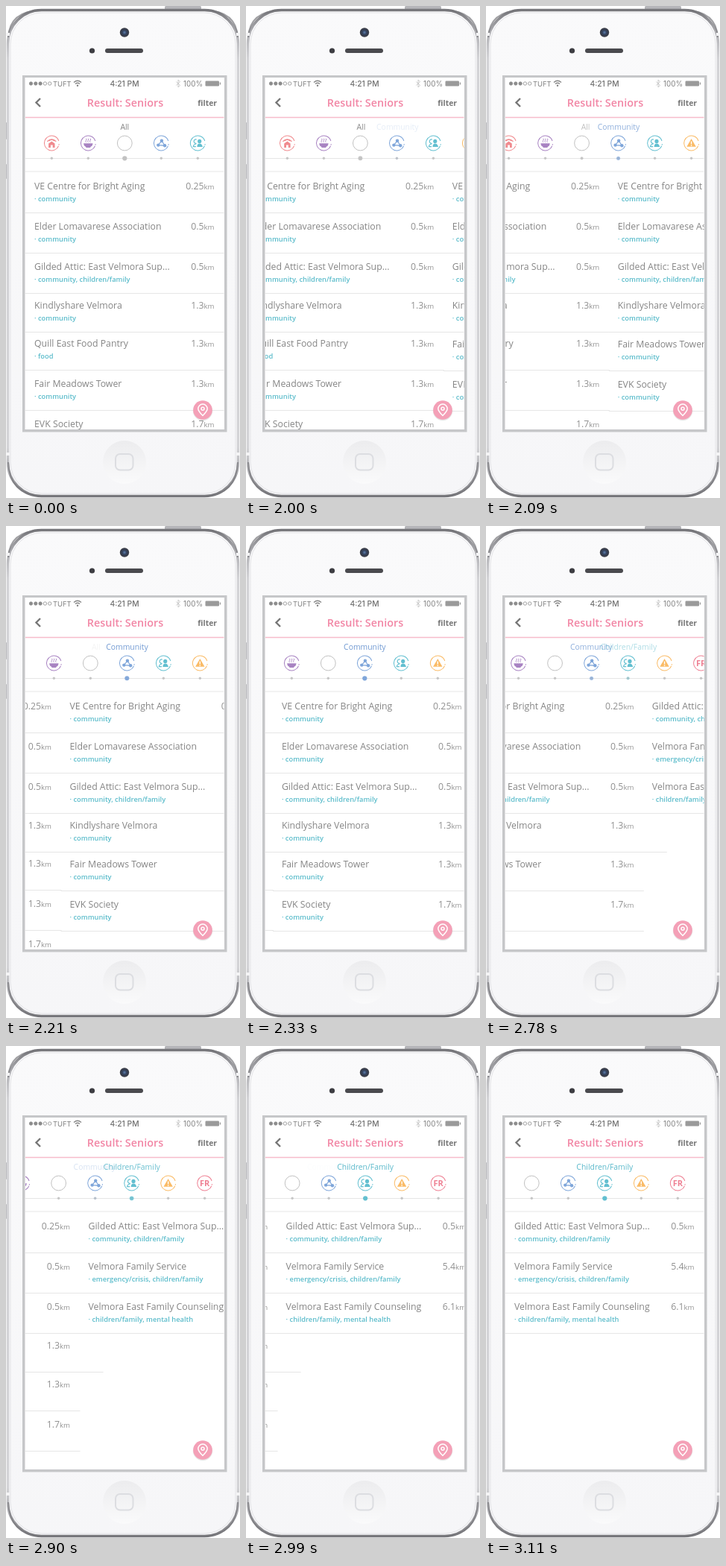
Recreate the animation shown at these times as an HTML page. Size 314 by 660 pixels, loop 5.11 s.

```html
<!DOCTYPE html>
<html lang="en">
<head>
<meta charset="utf-8">
<title>Result list</title>
<style>
html, body { margin: 0; width: 100%; height: 100%; overflow: hidden; background: #fff; }
svg { display: block; width: 314px; height: 660px; font-family: "Open Sans", "Noto Sans", sans-serif; }
.status { font: 10px Inter, "Liberation Sans", sans-serif; fill: #808080; }
.name { font-size: 12.3px; fill: #858585; }
.dist { font-size: 12.3px; fill: #909090; text-anchor: end; }
.unit { font-size: 9.6px; }
.tags { font-size: 9.3px; font-weight: 600; fill: #5bbccb; }
.label { font-size: 10.4px; text-anchor: middle; }
.sep { stroke: #e6e6e6; }
</style>
</head>
<body>
<svg viewBox="0 0 314 660">
  <defs>
    <linearGradient id="rim" x1="0" y1="0" x2="0" y2="1">
      <stop offset="0" stop-color="#77777b"/>
      <stop offset=".05" stop-color="#b4b4b8"/>
      <stop offset=".1" stop-color="#d3d3d6"/>
      <stop offset=".9" stop-color="#d3d3d6"/>
      <stop offset=".96" stop-color="#a8a8ac"/>
      <stop offset="1" stop-color="#77777b"/>
    </linearGradient>
    <linearGradient id="face" x1="0" y1="0" x2="0" y2="1">
      <stop offset="0" stop-color="#fafafb"/>
      <stop offset="1" stop-color="#f6f6f8"/>
    </linearGradient>
    <linearGradient id="home" x1="0" y1="0" x2="0" y2="1">
      <stop offset="0" stop-color="#ececee"/>
      <stop offset="1" stop-color="#fafafb"/>
    </linearGradient>
    <radialGradient id="lens">
      <stop offset="0" stop-color="#5f7fae"/>
      <stop offset=".45" stop-color="#34415c"/>
      <stop offset="1" stop-color="#3c3c42"/>
    </radialGradient>
    <clipPath id="screen"><rect x="26" y="96" width="266.5" height="472"/></clipPath>
  </defs>

  <!-- phone -->
  <g fill="#b5b5b9">
    <rect x="213" y="0" width="49" height="5" rx="1.5"/>
    <rect x="0" y="156" width="3" height="23" rx="1"/>
    <rect x="0" y="212" width="3" height="20" rx="1"/>
  </g>
  <rect x="2.5" y="5.5" width="309" height="652" rx="45" fill="url(#face)" stroke="url(#rim)" stroke-width="3.5"/>
  <rect x="6" y="9" width="302" height="645" rx="42" fill="none" stroke="#e3e3e6"/>
  <g fill="none" stroke="#77777b" stroke-width="2" opacity=".7">
    <path d="M3 42Q5 7 46 5.5M311 42Q309 7 268 5.5M3 612Q5 655 46 657.5M311 612Q309 655 268 657.5"/>
  </g>
  <path d="M0 38H5M309 38H314M0 601H5M309 601H314" stroke="#f4f4f5" stroke-width="4"/>
  <circle cx="159" cy="35.5" r="6.2" fill="url(#lens)"/>
  <circle cx="115.5" cy="60" r="3.6" fill="#3d3d42"/>
  <rect x="133" y="57" width="51" height="6" rx="3" fill="#4a4a4e"/>
  <circle cx="159" cy="612" r="29" fill="url(#home)"/>
  <rect x="147" y="601" width="23.5" height="21.5" rx="6" fill="none" stroke="#dcdde1" stroke-width="2"/>
  <rect x="22" y="93" width="274.5" height="478.5" fill="#c6c7c9"/>
  <rect x="25.5" y="96" width="267.5" height="472" fill="#fff"/>

  <!-- status bar -->
  <g stroke="#8c8c8c" stroke-width=".8" fill="#8c8c8c">
    <circle cx="33.5" cy="104" r="2.2"/>
    <circle cx="39.8" cy="104" r="2.2"/>
    <circle cx="46.1" cy="104" r="2.2"/>
    <circle cx="52.4" cy="104" r="2.2" fill="none"/>
    <circle cx="58.7" cy="104" r="2.2" fill="none"/>
  </g>
  <g class="status">
    <text x="63" y="107.6" font-size="9.4">TUFT</text>
    <text x="159" y="107.8" text-anchor="middle" font-size="10.3" font-weight="500" fill="#707070">4:21 PM</text>
    <text x="264" y="107.6" text-anchor="end" font-size="9.8">100%</text>
  </g>
  <g fill="none" stroke="#858585" stroke-width="1.3">
    <path d="M91 102.4Q96 98 101 102.4M93 104.6Q96 102 99 104.6"/>
    <circle cx="96" cy="106.8" r=".6"/>
  </g>
  <path d="M228.5 101.5L233.5 106.5L231 109V99L233.5 101.5L228.5 106.5" fill="none" stroke="#c4c4c4" stroke-width=".9"/>
  <rect x="267.5" y="100.5" width="18.5" height="7" rx="1.2" fill="#9a9a9a"/>
  <rect x="286.8" y="102.5" width="1.4" height="3" fill="#9a9a9a"/>

  <!-- title bar -->
  <path d="M46 124L40.5 129.5L46 135" fill="none" stroke="#777" stroke-width="2.4"/>
  <text x="160" y="134.8" text-anchor="middle" font-size="14.4" font-weight="600" fill="#f286a5">Result: Seniors</text>
  <text x="283" y="134" text-anchor="end" font-size="10.4" font-weight="700" fill="#777">filter</text>
  <path d="M26 149.5H292.5" stroke="#f7bccb" stroke-width="1.6"/>

  <g clip-path="url(#screen)">
    <g id="labels"></g>
    <path d="M26 204.5H293M26 222H293" class="sep"/>
    <g id="tabs"></g>
    <g id="pages"></g>
  </g>

  <!-- map button -->
  <circle cx="264" cy="543" r="13.2" fill="#000" opacity=".1"/>
  <circle cx="264" cy="542" r="12.8" fill="#f4a0b7"/>
  <g fill="none" stroke="#fff" stroke-width="1.5">
    <path d="M264 549.5Q257.8 543.5 257.8 540.3A6.2 6.2 0 0 1 270.2 540.3Q270.2 543.5 264 549.5Z"/>
    <circle cx="264" cy="540.3" r="2"/>
  </g>
</svg>

<script>
const LOOP = 5110, STEP = 30, PAGE_W = 266, GAP = 49, MID = 159.3;
const $ = id => document.getElementById(id);

function add(parent, markup) {
  const g = document.createElementNS("http://www.w3.org/2000/svg", "g");
  g.innerHTML = markup;
  parent.append(g);
  return g;
}

// Lists: row heights are given as the y offset of each row.
const centre = "VE Centre for Bright Aging", elder = "Elder Lomavarese Association",
  attic = "Gilded Attic: East Velmora Sup...", share = "Kindlyshare Velmora",
  tower = "Fair Meadows Tower", society = "EVK Society";
const com = "community", fam = "children/family", both = com + ", " + fam;

const lists = [
  [[0, centre, "0.25", com], [54, elder, "0.5", com], [108, attic, "0.5", both],
   [160, share, "1.3", com], [211, "Quill East Food Pantry", "1.3", "food"],
   [265, tower, "1.3", com], [319, society, "1.7", com]],
  [[0, centre, "0.25", com], [54, elder, "0.5", com], [108, attic, "0.5", both],
   [160, share, "1.3", com, 31], [212, tower, "1.3", com], [266, society, "1.7", com]],
  [[0, attic, "0.5", both], [54, "Velmora Family Service", "5.4", "emergency/crisis, " + fam],
   [108, "Velmora East Family Counseling", "6.1", fam + ", mental health"]]
];

const row = ([y, name, km, tags, extra = 0]) => `
  <text class="name" x="38" y="${y + 246.3}">${name}</text>
  <text class="dist" x="279.5" y="${y + 246.3}">${km}<tspan class="unit">km</tspan></text>
  <text class="tags" x="38" y="${y + 262.3}">· ${tags}</text>
  <path class="sep" d="M26 ${y + 277.5}H${293 + extra}"/>`;

const pages = lists.map(rows => add($("pages"), rows.map(row).join("")));

// Category tabs
const line = (d, w = 1.2) => `<path d="${d}" fill="none" stroke="currentColor" stroke-width="${w}"/>`;
const solid = d => `<path d="${d}" fill="currentColor"/>`;
const disc = (x, y, r) => `<circle cx="${x}" cy="${y}" r="${r}" fill="currentColor"/>`;

const kinds = [
  ["#f08a8e", solid("M-4.2 6V.5L0-2.6L4.2 .5V6H1.4V2.4H-1.4V6Z") +
    line("M-6-2.2Q0-8 6-2.2M-3.6-3Q0-6 3.6-3")],
  ["#a883c2", solid("M-6.2 .3H6.2Q5.8 4.2 3 5V6H-3V5Q-5.8 4.2-6.2 .3Z") +
    line("M-2.8-1.2q-1.2-1.5 0-2.6t0-2.4M0-1.2q-1.2-1.5 0-2.6t0-2.4M2.8-1.2q-1.2-1.5 0-2.6t0-2.4", 0.9)],
  ["#c2c2c2", ""],
  ["#7fa6da", line("M-4 2.6L.6-3.2L4.8 3.2L-4 2.6") + disc(-4, 2.6, 2.2) + disc(.6, -3.2, 2.2) + disc(4.8, 3.2, 2.2)],
  ["#62bfd0", disc(2.4, -2.6, 2.6) + solid("M-1 5Q-.6 .6 2.4 .6T6.6 5Z") +
    line("M-1.6-4.8A2.5 2.7 0 1 0-1.8 .2M-2 1Q-5.6 1.4-6 4.6H-2.4")],
  ["#fabb66", solid("M0-6L6.2 4.8H-6.2Z") +
    `<path d="M0-2.6V1.6M0 2.6V4" stroke="#fff" stroke-width="1.4"/>`],
  ["#ee7f92", `<text y="4" text-anchor="middle" font-size="11" font-weight="700" fill="currentColor">FR</text>`]
];

const tabs = kinds.map(([color, art]) => {
  const ring = art ? `stroke-dasharray="55 4 1.5 2.33" transform="rotate(22)"` : "";
  const g = add($("tabs"), `
    <g color="${color}" transform="translate(0 184)">
      <circle r="9.9" fill="none" stroke="currentColor" stroke-width="1" ${ring}/>${art}
    </g>
    <circle cy="204.3" r="1.7" fill="#c6c6c6"/>
    <circle cy="204.3" fill="${color}"/>`);
  return { g, dot: g.lastElementChild };
});

const labels = [["All", "#858585", 41], ["Community", "#7099d2", 50], ["Children/Family", "#5bb9cb", 50]]
  .map(([text, color, gap]) => ({
    gap, g: add($("labels"), `<text class="label" y="165.8" fill="${color}">${text}</text>`)
  }));

// Easing
function bezier(x1, y1, x2, y2) {
  const at = (a, b, s) => 3 * a * s * (1 - s) ** 2 + 3 * b * s * s * (1 - s) + s ** 3;
  return x => {
    if (x <= 0) return 0;
    if (x >= 1) return 1;
    let lo = 0, hi = 1;
    for (let i = 0; i < 24; i++) {
      const s = (lo + hi) / 2;
      if (at(x1, x2, s) < x) lo = s; else hi = s;
    }
    return at(y1, y2, lo);
  };
}
const ease = bezier(.25, .1, .25, 1), easeInOut = bezier(.42, 0, .58, 1);

const pagePos = t => ease((t - 1947) / 506) + easeInOut((t - 2600) / 470);
const tabPos = t => ease((t - 1958) / 363) + easeInOut((t - 2600) / 430);

function draw(time) {
  const t = time < 2000 ? 0 : 2000 + Math.floor((time - 2000) / STEP) * STEP;
  const page = pagePos(t), tab = tabPos(t);

  pages.forEach((g, i) => {
    const d = i - page;
    g.setAttribute("transform", `translate(${d * PAGE_W} 0)`);
    g.setAttribute("visibility", Math.abs(d) < 1 ? "visible" : "hidden");
  });

  tabs.forEach(({ g, dot }, i) => {
    const d = i - 2 - tab, near = Math.max(0, 1 - Math.abs(d));
    g.setAttribute("transform", `translate(${MID + d * GAP} 0)`);
    dot.setAttribute("r", 1.7 + 1.4 * near);
    dot.setAttribute("opacity", near);
  });

  labels.forEach(({ g, gap }, i) => {
    const d = i - tab;
    g.setAttribute("transform", `translate(${MID + d * gap} 0)`);
    g.setAttribute("opacity", Math.max(0, 1 - Math.abs(d) ** 1.5));
  });
}

const start = performance.now();
function tick() {
  draw((performance.now() - start) % LOOP);
  requestAnimationFrame(tick);
}
tick();
</script>
</body>
</html>
```
